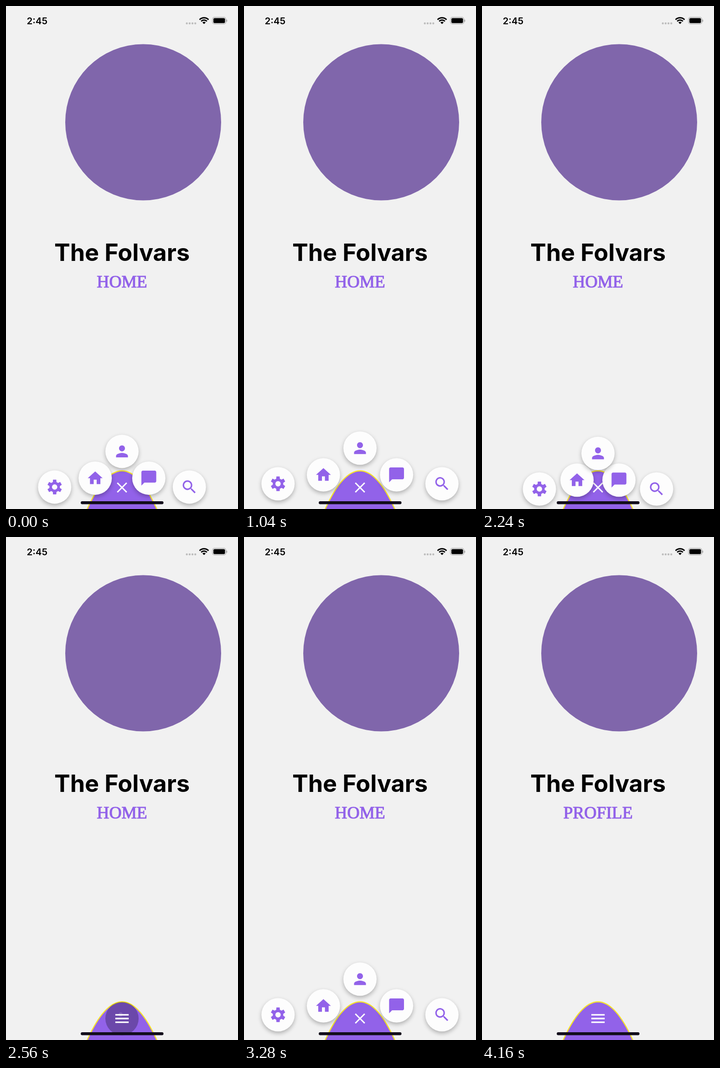
An HTML page with a canvas that plays this animation: 509 by 1101 pixels, repeating every 4240 ms.

```html
<!DOCTYPE html>
<html lang="en">
<head>
<meta charset="utf-8">
<title>Radial menu</title>
<style>
  html, body { margin: 0; width: 100%; height: 100%; overflow: hidden; background: #f1f1f1; }
  canvas { display: block; width: 509px; height: 1101px; }
</style>
</head>
<body>
<canvas id="stage" width="509" height="1101"></canvas>
<script>
const ctx = document.getElementById('stage').getContext('2d');
const LOOP = 4240;
const CENTER = 254.5;
const VIOLET = '#9262e9';
const TAU = Math.PI * 2;

const PATHS = {
  home: new Path2D('M10 20v-6h4v6h5v-8h3L12 3 2 12h3v8z'),
  person: new Path2D('M12 12c2.21 0 4-1.79 4-4s-1.79-4-4-4-4 1.79-4 4 1.79 4 4 4zm0 2c-2.67 0-8 1.34-8 4v2h16v-2c0-2.66-5.33-4-8-4z'),
  chat: new Path2D('M20 2H4c-1.1 0-2 .9-2 2v18l4-4h14c1.1 0 2-.9 2-2V4c0-1.1-.9-2-2-2z'),
  close: new Path2D('M5.7 5.7 18.3 18.3M18.3 5.7 5.7 18.3'),
  menu: new Path2D('M3 7h18M3 12h18M3 17h18'),
  search: new Path2D('M15.5 14h-.79l-.28-.27A6.5 6.5 0 1 0 13.73 14.43l.27.28v.79l5 4.99L20.49 19zM9.5 14a4.5 4.5 0 1 1 0-9a4.5 4.5 0 1 1 0 9z'),
  gear: gearPath()
};

// Open position and inward travel along x; every button also sinks by SINK.
const SINK = 13.05;
const BUTTONS = [
  { icon: 'gear', x: 73.5, y: 1045.5, slide: 4.5 },
  { icon: 'search', x: 435.5, y: 1045.5, slide: -4.5 },
  { icon: 'home', x: 173.5, y: 1026, slide: 3 },
  { icon: 'chat', x: 335.5, y: 1026, slide: -3 },
  { icon: 'person', x: CENTER, y: 967.5, slide: 0 }
];

const PRESSES = [[260, 540], [1500, 1880], [2460, 2790]];

const clamp = v => Math.min(1, Math.max(0, v));

function gearPath() {
  const path = new Path2D();
  for (let i = 0; i < 6; i++) {
    const mid = i * TAU / 6 - Math.PI / 2;
    [[-0.35, 7.15], [-0.22, 10.1], [0.22, 10.1], [0.35, 7.15]].forEach(([turn, r], j) => {
      const x = 12 + r * Math.cos(mid + turn), y = 12 + r * Math.sin(mid + turn);
      i || j ? path.lineTo(x, y) : path.moveTo(x, y);
    });
  }
  path.closePath();
  path.moveTo(15.6, 12);
  path.arc(12, 12, 3.6, 0, TAU, true);
  return path;
}

function easeInOut(t) {
  t = clamp(t);
  const half = u => 0.5 * Math.pow(2 * u, 1.8);
  return t < 0.5 ? half(t) : 1 - half(1 - t);
}

// Remaining distance of an underdamped spring, from 1 to 0.
function spring(ms) {
  const s = Math.max(0, ms) / 1000, decay = 8, freq = 12.9;
  return Math.exp(-decay * s) * (Math.cos(freq * s) + decay / freq * Math.sin(freq * s));
}

// 0 is open, 1 is closed, null means the buttons are gone.
function menuGap(t) {
  if (t < 172) return easeInOut((t + 198) / 370);
  if (t < 540) return null;
  if (t < 1880) return spring(t - 540);
  if (t < 2000) return 0.085 * clamp((t - 1880) / 35);
  if (t < 2310) return 0.085 + 0.915 * easeInOut((t - 2000) / 310);
  if (t < 2797) return null;
  if (t < 3787) return spring(t - 2797);
  if (t < 4157) return easeInOut((t - 3787) / 370);
  return null;
}

function disc(x, y, r, fill) {
  ctx.beginPath();
  ctx.arc(x, y, r, 0, TAU);
  ctx.fillStyle = fill;
  ctx.fill();
}

function pill(x, y, w, h, r, fill) {
  ctx.beginPath();
  ctx.roundRect(x, y, w, h, r);
  ctx.fillStyle = fill;
  ctx.fill();
}

function label(text, x, y, font, fill, align = 'center') {
  ctx.font = font;
  ctx.fillStyle = fill;
  ctx.textAlign = align;
  ctx.fillText(text, x, y);
}

function icon(name, x, y, color, line) {
  ctx.save();
  ctx.translate(x, y);
  ctx.scale(1.63, 1.63);
  ctx.translate(-12, -12);
  ctx.fillStyle = ctx.strokeStyle = color;
  if (line) {
    ctx.lineWidth = line;
    ctx.stroke(PATHS[name]);
  } else {
    ctx.fill(PATHS[name]);
    ctx.lineJoin = 'round';
  }
  ctx.restore();
}

function statusBar() {
  label('2:45', 45.5, 39.6, '600 20.5px Inter, sans-serif', '#000', 'left');
  for (let i = 0; i < 4; i++) disc(396.7 + i * 6.2, 38, 2.2, '#bdbdbd');

  const wifiY = 39.5, spread = 0.8;
  ctx.strokeStyle = '#000';
  ctx.lineWidth = 3;
  for (const r of [8.7, 13.7]) {
    ctx.beginPath();
    ctx.arc(434.5, wifiY, r, -Math.PI / 2 - spread, -Math.PI / 2 + spread);
    ctx.stroke();
  }
  ctx.beginPath();
  ctx.moveTo(434.5, wifiY);
  ctx.arc(434.5, wifiY, 5, -Math.PI / 2 - spread, -Math.PI / 2 + spread);
  ctx.fillStyle = '#000';
  ctx.fill();

  ctx.beginPath();
  ctx.roundRect(453, 24.5, 29.5, 15, 4.5);
  ctx.strokeStyle = '#a0a0a0';
  ctx.lineWidth = 1.2;
  ctx.stroke();
  pill(455, 26.5, 25.5, 11, 2.8, '#000');
  pill(483.5, 29.7, 1.7, 5, 1, '#a0a0a0');
}

function header(t) {
  disc(301, 254.5, 171, '#8066ab');
  label('The Folvars', CENTER, 557.8, '700 52px Inter, sans-serif', '#000');
  const page = t < 3680 ? 'HOME' : 'PROFILE';
  label(page, CENTER, 615.8, '37.5px "Liberation Serif", serif', VIOLET);
  ctx.strokeStyle = VIOLET;
  ctx.lineWidth = 1.2;
  ctx.strokeText(page, CENTER, 615.8);
}

function hump() {
  ctx.beginPath();
  ctx.moveTo(CENTER - 77.2, 1103);
  ctx.quadraticCurveTo(CENTER, 932, CENTER + 77.2, 1103);
  ctx.fillStyle = VIOLET;
  ctx.fill();
  ctx.strokeStyle = '#f6e32b';
  ctx.lineWidth = 2.4;
  ctx.stroke();
}

function pressGlow(t) {
  const press = PRESSES.find(([from, to]) => t >= from && t < to);
  if (!press) return;
  const age = t - press[0];
  const strength = clamp(age / 60) * clamp((press[1] - t) / 60);
  ctx.save();
  ctx.globalAlpha = strength;
  disc(CENTER, 1054, 36.5, 'rgba(0,0,0,.27)');
  ctx.clip();
  const grow = clamp((age - 80) / 180);
  disc(251.5, 1045, 38 * grow, `rgba(255,255,255,${0.17 * (1 - grow)})`);
  ctx.restore();
}

function menuButton({ icon: name, x, y, slide }, gap) {
  const drop = gap * SINK;
  const cx = x + slide * drop, cy = y + drop;
  ctx.save();
  ctx.shadowColor = 'rgba(0,0,0,.27)';
  ctx.shadowBlur = 10;
  ctx.shadowOffsetY = 4;
  disc(cx, cy, 36.5, '#fdfdfd');
  ctx.restore();
  icon(name, cx, cy, VIOLET);
}

function draw(t) {
  ctx.fillStyle = '#f1f1f1';
  ctx.fillRect(0, 0, 509, 1101);
  statusBar();
  header(t);
  hump();
  pressGlow(t);
  const gap = menuGap(t);
  if (gap === null) {
    icon('menu', CENTER, 1054, '#fff', 2);
  } else {
    icon('close', CENTER, 1054, '#fff', 1.9);
    BUTTONS.forEach(button => menuButton(button, gap));
  }
  pill(164, 1084, 181.5, 6.5, 3.25, '#120d1b');
}

const start = performance.now();
function tick() {
  draw((performance.now() - start) % LOOP);
  requestAnimationFrame(tick);
}
tick();
</script>
</body>
</html>
```
